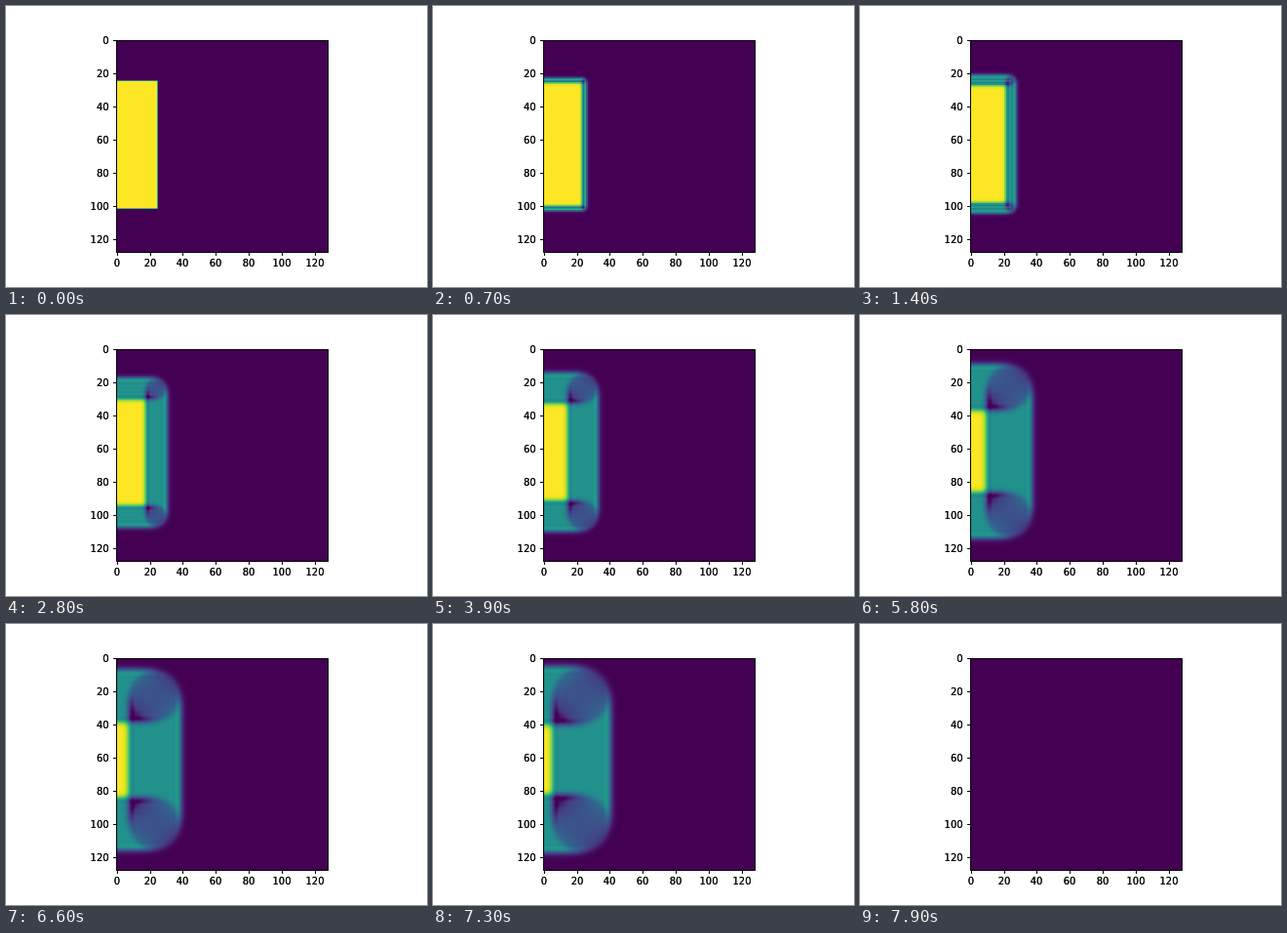
An HTML page with a canvas that plays this animation: 432 by 288 pixels, repeating every 8000 ms.

```html
<!DOCTYPE html>
<html lang="en">
<head>
<meta charset="utf-8">
<title>Wave on a grid</title>
<style>
html, body { margin: 0; width: 100%; height: 100%; overflow: hidden; background: #fff; }
canvas { display: block; width: 432px; height: 288px; }
</style>
</head>
<body>
<canvas id="stage" width="432" height="288"></canvas>
<script>
const ctx = document.getElementById('stage').getContext('2d');
const N = 128, STEPS = 80, STEP_MS = 100;
const SPEED2 = 0.245 ** 2, DAMPING = 0.024, DRIFT = 0.026;
const LEFT = 113, TOP = 34, SIZE = 218;

const stops = '440154 482475 414487 355f8d 2a788e 21918c 22a884 44bf70 7ad151 bddf26 fde725'
  .split(' ')
  .map(h => [0, 2, 4].map(k => parseInt(h.slice(k, k + 2), 16)));

// Colour map with 256 levels
const palette = Array.from({ length: 256 }, (_, i) => {
  const p = i / 255 * (stops.length - 1);
  const k = Math.min(Math.floor(p), stops.length - 2);
  return stops[k].map((c, j) => Math.round(c + (stops[k + 1][j] - c) * (p - k)));
});

// Damped 2D wave equation with reflecting borders, started from a block at rest
function simulate() {
  const u = new Float32Array(N * N);
  const v = new Float32Array(N * N);
  const w = new Float32Array(N * N);
  for (let y = 25; y < 102; y++) u.fill(1, y * N, y * N + 25);

  const fields = [u.slice()];
  while (fields.length < STEPS - 1) {
    for (let i = 0; i < w.length; i++) w[i] = SPEED2 * u[i] + DAMPING * v[i];
    for (let y = 0; y < N; y++) {
      const up = y > 0 ? -N : 0, down = y < N - 1 ? N : 0;
      for (let x = 0; x < N; x++) {
        const i = y * N + x;
        const l = x > 0 ? -1 : 0, r = x < N - 1 ? 1 : 0;
        v[i] += w[i + up] + w[i + down] + w[i + l] + w[i + r] - 4 * w[i];
      }
    }
    for (let i = 0; i < u.length; i++) u[i] += v[i];
    fields.push(u.slice());
  }
  fields.push(new Float32Array(N * N));
  return fields;
}

// Neighbouring cells and Hann weight for every pixel along one axis
function samples(shift) {
  return Array.from({ length: SIZE }, (_, p) => {
    const pos = Math.min(N - 1, Math.max(0, (p + 0.5) * N / SIZE - 0.5 + shift));
    const a = Math.floor(pos);
    return { a, b: Math.min(a + 1, N - 1), t: 0.5 - 0.5 * Math.cos(Math.PI * (pos - a)) };
  });
}

const fields = simulate();
const image = ctx.createImageData(SIZE, SIZE);

function drawField(n) {
  const f = fields[n], axis = samples(DRIFT * n);
  let o = 0;
  for (const row of axis) {
    const ra = row.a * N, rb = row.b * N;
    for (const col of axis) {
      const top = f[ra + col.a] + (f[ra + col.b] - f[ra + col.a]) * col.t;
      const low = f[rb + col.a] + (f[rb + col.b] - f[rb + col.a]) * col.t;
      const value = Math.min(1, Math.max(0, top + (low - top) * row.t));
      const [r, g, b] = palette[Math.round(value * 255)];
      image.data[o++] = r;
      image.data[o++] = g;
      image.data[o++] = b;
      image.data[o++] = 255;
    }
  }
  ctx.putImageData(image, LEFT, TOP, 0, 1, SIZE, SIZE - 1);
}

function label(text, x, y, align) {
  ctx.textAlign = align;
  ctx.fillText(text, x, y);
  ctx.fillText(text, x, y);
}

function drawAxes() {
  ctx.fillStyle = ctx.strokeStyle = '#000';
  ctx.lineWidth = 1;
  ctx.font = '10px "DejaVu Sans", sans-serif';
  ctx.strokeRect(113.5, 35.5, 217, 217);
  for (let k = 0; k <= 120; k += 20) {
    const d = (k + 0.5) * 1.69875;
    const x = Math.round(112.68 + d), y = Math.round(34.56 + d);
    ctx.fillRect(x, 253, 1, 3);
    ctx.fillRect(110, y, 3, 1);
    label(k, x, 267, 'center');
    label(k, 105.7, y + 4, 'right');
  }
}

let shown = -1;
function tick(now) {
  const n = Math.floor(now / STEP_MS) % STEPS;
  if (n !== shown) {
    shown = n;
    ctx.fillStyle = '#fff';
    ctx.fillRect(0, 0, 432, 288);
    drawField(n);
    drawAxes();
  }
  requestAnimationFrame(tick);
}
tick(performance.now());
</script>
</body>
</html>
```
